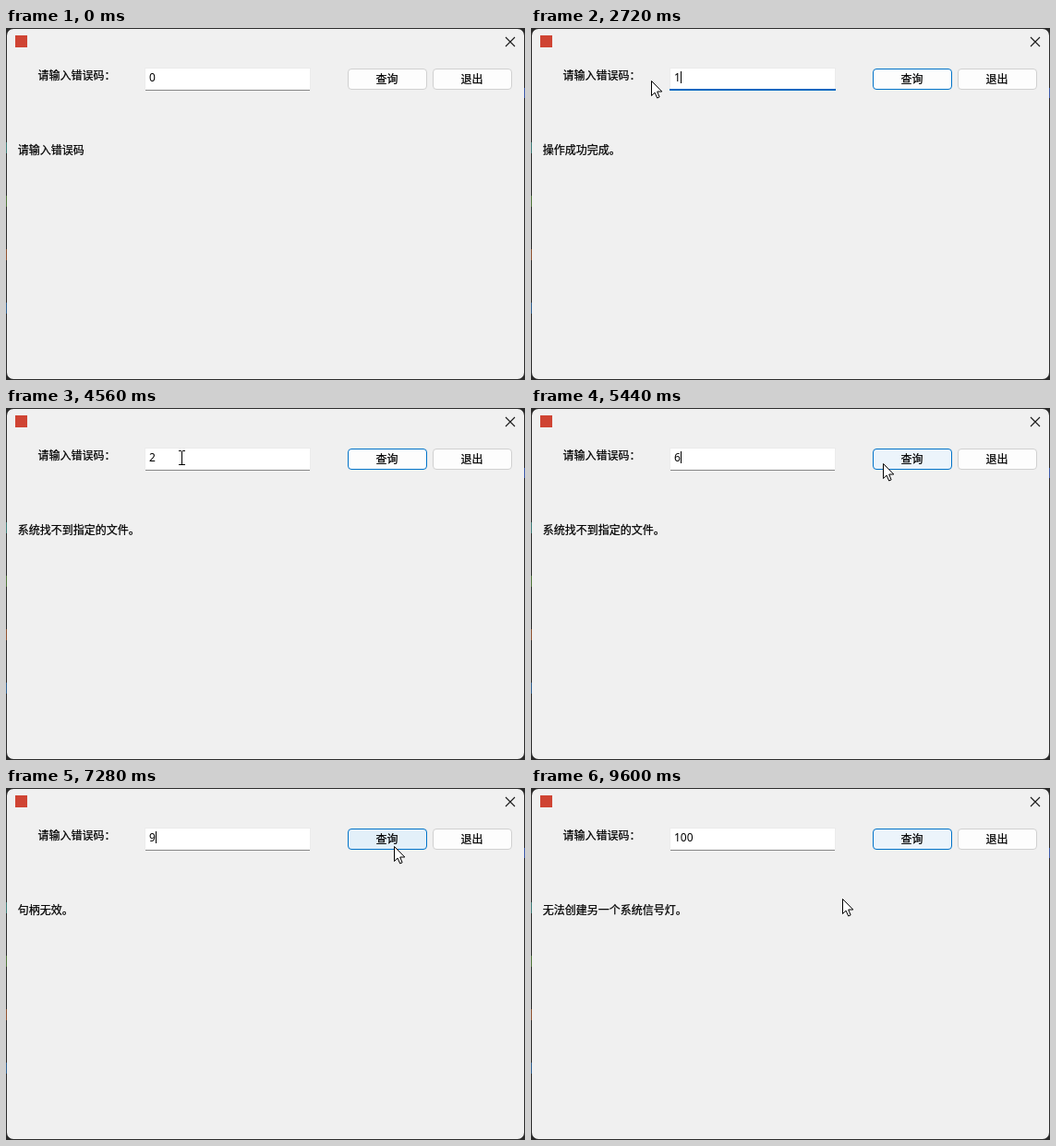
Recreate the animation shown at these times as an HTML page with a canvas. Size 562 by 382 pixels, loop 9.64 s.

```html
<!DOCTYPE html>
<html lang="zh-CN">
<head>
<meta charset="utf-8">
<title>错误码查询</title>
<style>
  html, body { margin: 0; width: 100%; height: 100%; overflow: hidden; background: #2b2b2b; }
  canvas { display: block; }
</style>
</head>
<body>
<canvas id="stage" width="562" height="382"></canvas>
<script>
const ctx = document.getElementById('stage').getContext('2d');
const LOOP = 9640, FADE = 200, KEY_GAP = 150, DRAG = 280;
const CJK = '12px "Noto Sans CJK SC", "Noto Sans CJK", sans-serif';
const LATIN = '12px "Noto Sans", "Open Sans", sans-serif';
const EDIT = { x: 150, y: 43, w: 180, h: 25 };
const QUERY = { x: 370, y: 44, w: 86, h: 23, label: '查询' };
const EXIT = { x: 462, y: 44, w: 86, h: 23, label: '退出' };
const GRAB = { x: 190, y: 54 };

// Each lookup: press in the field, drag left, type a code, click the query button
const ROUNDS = [
  { press: 480, left: { x: 91, y: 47 }, type: 1200, click: 1740, spot: { x: 413, y: 54 }, swing: 3.2,
    keys: '0', message: '操作成功完成。' },
  { press: 2400, left: { x: 130, y: 57 }, type: 2720, click: 3040, keys: '1', message: '函数不正确。' },
  { press: 3380, left: { x: 116, y: 47 }, type: 3640, click: 4140, keys: '2', message: '系统找不到指定的文件。' },
  { press: 4620, left: { x: 120, y: 58 }, type: 5180, click: 5440, spot: { x: 381, y: 60 },
    keys: '6', message: '句柄无效。' },
  { press: 6300, left: { x: 56, y: 64 }, type: 6800, click: 7280, keys: '9', message: '存储控制块地址无效。' },
  { press: 7860, left: GRAB, type: 8240, click: 9180, keys: '100', message: '无法创建另一个系统信号灯。' }
];

const easeOut = u => 1 - (1 - u) ** 3;
const easeBack = s => u => 1 + (s + 1) * (u - 1) ** 3 + s * (u - 1) ** 2;
const clamp = v => Math.max(0, Math.min(1, v));
const inside = (p, r) => p.x >= r.x && p.x < r.x + r.w && p.y >= r.y && p.y < r.y + r.h;
const mix = (a, b, k) => `rgb(${a.map((v, i) => Math.round(v + (b[i] - v) * k)).join()})`;

function planMoves() {
  const moves = [];
  const go = (from, until, to, ease = easeOut) => moves.push({ from, until, to, ease });
  let leave = 40;
  for (const { press, left, type, click, keys, spot = { x: 420, y: 63 }, swing = 1.7 } of ROUNDS) {
    go(leave, press - 60, GRAB);
    go(press, press + DRAG, left);
    go(type + 80 + KEY_GAP * (keys.length - 1), click, spot, easeBack(swing));
    leave = click + 160;
  }
  go(LOOP - 120, LOOP - 40, { x: 337, y: 120 });
  return moves;
}

const MOVES = planMoves();

function pointerAt(t) {
  let p = { x: 335, y: 400 };
  for (const { from, until, to, ease } of MOVES) {
    if (t < from) break;
    const k = ease(clamp((t - from) / (until - from)));
    p = { x: p.x + (to.x - p.x) * k, y: p.y + (to.y - p.y) * k };
  }
  return p;
}

// Share of the recent past spent over a button
function hoverAt(t, rect) {
  const n = 20;
  let hits = 0;
  for (let i = 0; i < n; i++) hits += inside(pointerAt(t - i * FADE / n), rect);
  return hits / n;
}

function valueAt(t) {
  const typed = ROUNDS.filter(r => r.type <= t).pop();
  return typed ? typed.keys.slice(0, 1 + Math.floor((t - typed.type) / KEY_GAP)) : '0';
}

function messageAt(t) {
  const done = ROUNDS.filter(r => r.click + 100 <= t).pop();
  return done ? done.message : '请输入错误码';
}

function fill(color, x, y, w, h) {
  ctx.fillStyle = color;
  ctx.fillRect(x, y, w, h);
}

function text(str, x, y, align = 'left') {
  ctx.font = CJK;
  ctx.textAlign = align;
  ctx.fillStyle = ctx.strokeStyle = '#000';
  ctx.lineWidth = .25;
  ctx.fillText(str, x, y);
  ctx.strokeText(str, x, y);
}

function drawWindow() {
  fill('#2b2b2b', 0, 0, 562, 382);
  ['#3f7d78', '#4f7438', '#8f5230', '#2f5f8e'].forEach((color, i) => fill(color, 0, 124 + i * 58, 1, 12));
  fill('#3c58a8', 561, 65, 1, 11);
  ctx.fillStyle = '#f0f0f0';
  ctx.beginPath();
  ctx.roundRect(1, 1, 560, 380, 7);
  ctx.fill();
  fill('#cf4433', 10, 8, 13, 13);
  ctx.strokeStyle = '#1a1a1a';
  ctx.lineWidth = 1.1;
  ctx.beginPath();
  ctx.moveTo(541, 10); ctx.lineTo(551, 20);
  ctx.moveTo(551, 10); ctx.lineTo(541, 20);
  ctx.stroke();
}

function drawButton(b, hover, isDefault) {
  const blue = [0, 114, 200];
  ctx.beginPath();
  ctx.roundRect(b.x + .5, b.y + .5, b.w - 1, b.h - 1, 3.5);
  ctx.fillStyle = mix([253, 253, 253], [224, 238, 249], hover);
  ctx.fill();
  ctx.lineWidth = 1;
  ctx.strokeStyle = mix(isDefault ? blue : [208, 208, 208], blue, hover);
  ctx.stroke();
  text(b.label, b.x + b.w / 2 - .5, 60, 'center');
}

function drawEdit(t, round) {
  const value = valueAt(t);
  const focused = round && t < round.click;
  const selected = focused && t >= round.press + 80 && t < round.type;
  fill('#ebebeb', 150, 43, 180, 24);
  fill('#fff', 151, 44, 178, 23);
  fill('#868686', 151, 67, 178, 1);
  if (focused) {
    ctx.globalAlpha = clamp((t - round.press) / FADE);
    fill('#0067c0', 150, 66, 180, 2);
    ctx.globalAlpha = 1;
  }
  if (selected) fill('#0078d4', 155, 46, 8, 15);
  ctx.font = LATIN;
  ctx.textAlign = 'left';
  ctx.fillStyle = selected ? '#fff' : '#000';
  ctx.fillText(value, 155, 58);

  if (!round || selected || t >= round.click + 60) return;
  const lastKey = round.type + KEY_GAP * (value.length - 1);
  const idle = t - (t >= round.type ? lastKey : round.press);
  if (idle % 1060 < 530) fill('#000', 155 + value.length * 7, 47, 1, 13);
}

function drawArrow(x, y) {
  const outline = [[0, 0], [0, 16], [3.6, 12.6], [6.2, 18.5], [8.6, 17.4], [6.2, 11.5], [11.3, 11.5]];
  ctx.beginPath();
  outline.forEach(([dx, dy]) => ctx.lineTo(x + .5 + dx, y + .5 + dy));
  ctx.closePath();
  ctx.fillStyle = '#fff';
  ctx.fill();
  ctx.strokeStyle = '#000';
  ctx.lineWidth = 1;
  ctx.stroke();
}

function drawBeam(x, y) {
  fill('#000', x, y - 7, 1, 15);
  for (const row of [y - 8, y + 7]) {
    fill('#000', x - 3, row, 3, 1);
    fill('#000', x + 1, row, 3, 1);
  }
}

function draw(t) {
  const round = ROUNDS.filter(r => r.press <= t).pop();
  drawWindow();
  text('请输入错误码：', 34.5, 56);
  drawEdit(t, round);
  drawButton(QUERY, hoverAt(t, QUERY), !!round);
  drawButton(EXIT, hoverAt(t, EXIT), false);
  text(messageAt(t), 12.7, 137);
  const p = pointerAt(t);
  const dragging = round && t < round.press + DRAG;
  const drawPointer = dragging || inside(p, EDIT) ? drawBeam : drawArrow;
  drawPointer(Math.round(p.x), Math.round(p.y));
}

const start = performance.now();
function tick() {
  const t = (performance.now() - start) % LOOP;
  draw(Math.floor(t / 40) * 40);
  requestAnimationFrame(tick);
}
tick();
</script>
</body>
</html>
```
